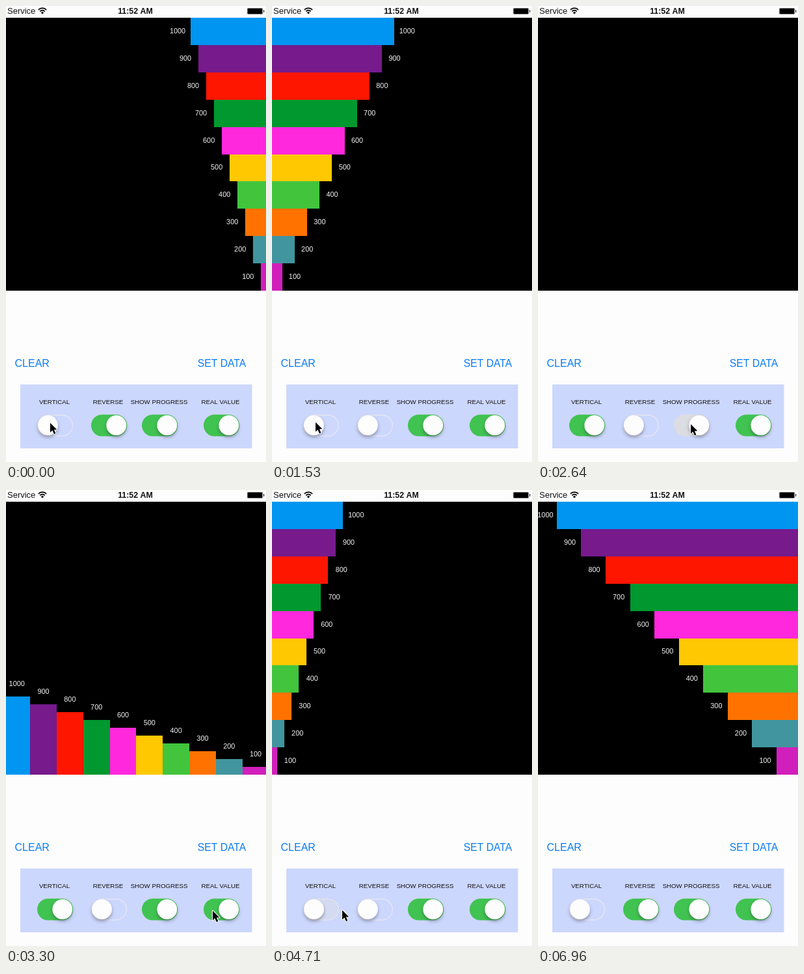
An HTML page with a canvas for the animation above (6.99 s loop, 400 by 700 pixels).

```html
<!DOCTYPE html>
<html lang="en">
<head>
<meta charset="utf-8">
<title>Bar chart demo</title>
<style>
  html, body { margin: 0; width: 100%; height: 100%; overflow: hidden; background: #fdfdfd; }
  canvas { display: block; width: 400px; height: 700px; }
</style>
</head>
<body>
<canvas id="stage"></canvas>
<script>
const LOOP = 6990, STEP = 30, GROW = 450, SLIDE = 100;
const FONT = '"Liberation Sans", Arial, sans-serif';
const PAPER = '#fdfdfd', GREEN = '#40c351', BLUE = '#0a7bf2';
const COLORS = ['#0095f0', '#761a8c', '#ff1600', '#00982f', '#ff28dc',
                '#ffc800', '#42c43d', '#ff7200', '#40959e', '#d11fbb'];

// Chart area; the bars run slightly past both sides of the screen.
const TOP = 18, BOTTOM = 437, LEFT = -3.7, RIGHT = 404.5;
const ROW = (BOTTOM - TOP) / 10, COL = (RIGHT - LEFT) / 10;

const SWITCHES = [
  { key: 'vertical', text: 'VERTICAL', x: 48, mid: 74.5 },
  { key: 'reverse', text: 'REVERSE', x: 131, mid: 157 },
  { key: 'progress', text: 'SHOW PROGRESS', x: 209, mid: 235.5 },
  { key: 'real', text: 'REAL VALUE', x: 304, mid: 330 }
];
const START = { vertical: false, reverse: true, progress: true, real: true };
const FIRST_GROW = -144;
const TAPS = [
  [400, 'vertical'], [910, 'reverse'], [1300, 'vertical'], [1689, 'vertical'],
  [2640, 'progress'], [3153, 'progress'], [3490, 'real'], [4060, 'real'],
  [4575, 'vertical'], [5290, 'reverse']
];
const POINTER = [
  [0, 68, 640], [450, 68, 640], [800, 152, 640], [1000, 152, 640],
  [1250, 67, 639], [2150, 67, 639], [2500, 235, 642], [3180, 235, 642],
  [3300, 318, 646], [3420, 327, 639], [4150, 327, 639], [4500, 68, 640],
  [4600, 68, 640], [4710, 108, 645], [4950, 150, 642], [5400, 150, 642],
  [5700, 405, 650]
];

const canvas = document.getElementById('stage');
const ctx = canvas.getContext('2d');
const ratio = window.devicePixelRatio || 1;
canvas.width = 400 * ratio;
canvas.height = 700 * ratio;
ctx.scale(ratio, ratio);

const clamp = v => Math.max(0, Math.min(1, v));

function rect(x, y, w, h, color) {
  ctx.fillStyle = color;
  ctx.fillRect(x, y, w, h);
}

// Bars have crisp edges on whole pixels.
function bar(x, y, w, h, color) {
  const left = Math.round(x), top = Math.round(y);
  rect(left, top, Math.round(x + w) - left, Math.round(y + h) - top, color);
}

function pill(x, y, w, h, r) {
  ctx.beginPath();
  ctx.roundRect(x, y, w, h, r);
}

function text(str, x, y, size, color, align = 'center', weight = '') {
  ctx.font = `${weight} ${size}px ${FONT}`;
  ctx.textAlign = align;
  ctx.textBaseline = 'middle';
  ctx.fillStyle = color;
  ctx.fillText(str, x, y);
}

function stateAt(t) {
  const state = { ...START, since: FIRST_GROW, tapped: {} };
  for (const [time, key] of TAPS) {
    if (time > t) break;
    state[key] = !state[key];
    state.since = state.tapped[key] = time;
  }
  return state;
}

function drawStatus() {
  text('Service', 2, 8.5, 13, '#111', 'left');
  text('11:52 AM', 199, 8.6, 12.4, '#111', 'center', 'bold');

  // Signal fan
  ctx.strokeStyle = ctx.fillStyle = '#111';
  ctx.lineWidth = 1.9;
  for (const r of [5.3, 8.7]) {
    ctx.beginPath();
    ctx.arc(56, 12, r, -Math.PI * 0.75, -Math.PI * 0.25);
    ctx.stroke();
  }
  ctx.beginPath();
  ctx.moveTo(56, 12.5);
  ctx.arc(56, 12.5, 3.2, -Math.PI * 0.75, -Math.PI * 0.25);
  ctx.fill();

  // Battery
  pill(370.8, 3, 24.4, 9.8, 2);
  ctx.fillStyle = '#777';
  ctx.fill();
  rect(372, 4, 22, 8, '#000');
  rect(396, 6.2, 1.3, 3.5, '#333');
}

function drawChart(state, t) {
  rect(0, TOP, 400, BOTTOM - TOP, '#000');
  ctx.save();
  ctx.beginPath();
  ctx.rect(0, TOP, 400, BOTTOM - TOP);
  ctx.clip();

  const { vertical, reverse, progress, real } = state;
  const grown = clamp((t - state.since) / GROW);
  const full = vertical ? (progress ? 366 : 419) : (progress ? 375.7 : 408);
  const gap = vertical ? 20.8 - 5 * grown : 21.6 - 4.2 * grown;

  COLORS.forEach((color, i) => {
    const n = 10 - i;
    const len = full * grown * n / 10;
    let x, y;
    if (vertical) {
      const left = LEFT + i * COL;
      bar(left, reverse ? TOP : BOTTOM - len, COL, len, color);
      x = left + COL / 2;
      y = reverse ? TOP + len + gap : BOTTOM - len - gap;
    } else {
      const top = TOP + i * ROW;
      bar(reverse ? RIGHT - len : LEFT, top, len, ROW, color);
      x = reverse ? RIGHT - len - gap : LEFT + len + gap;
      y = top + ROW / 2;
    }
    if (progress) {
      // Truncation makes 70 percent read as 69.
      const percent = n === 7 ? 69 : n * 10;
      text(real ? n * 100 : percent + '%', x, y, 10.9, '#f4f4f4');
    }
  });
  ctx.restore();
}

function drawSwitch({ key, text: label, x, mid }, state, t) {
  text(label, mid, 608, 9.7, '#111');

  const age = t - (state.tapped[key] ?? -1000);
  const eased = 1 - (1 - clamp(age / SLIDE)) ** 2;
  const pos = state[key] ? eased : 1 - eased;

  pill(x + 0.8, 628, 53.6, 32, 16);
  ctx.globalAlpha = 1 - pos;
  ctx.strokeStyle = '#e4e6f2';
  ctx.lineWidth = 1.4;
  ctx.stroke();
  pill(x, 627.2, 55.2, 33.4, 16.7);
  ctx.globalAlpha = state[key] ? eased : 1 - clamp(age / 240);
  ctx.fillStyle = state[key] ? GREEN : '#dcdde2';
  ctx.fill();
  ctx.globalAlpha = 1;

  ctx.save();
  ctx.shadowColor = 'rgba(50, 50, 60, 0.42)';
  ctx.shadowBlur = 5 * ratio;
  ctx.shadowOffsetY = 3 * ratio;
  ctx.beginPath();
  ctx.arc(x + 16.5 + 22.3 * pos, 643.7, 15.4, 0, Math.PI * 2);
  ctx.fillStyle = PAPER;
  ctx.fill();
  ctx.restore();
}

function drawPointer(t) {
  const next = POINTER.findIndex(p => p[0] > t);
  if (next < 1) return;
  const [t0, x0, y0] = POINTER[next - 1];
  const [t1, x1, y1] = POINTER[next];
  const k = (t - t0) / (t1 - t0);

  ctx.save();
  ctx.translate(x0 + (x1 - x0) * k, y0 + (y1 - y0) * k);
  ctx.beginPath();
  ctx.moveTo(0, 0);
  for (const [x, y] of [[0, 14.5], [3.4, 11.4], [6, 17.2], [8.4, 16.1], [5.9, 10.5], [10.3, 10.2]]) {
    ctx.lineTo(x, y);
  }
  ctx.closePath();
  ctx.lineJoin = 'round';
  ctx.lineWidth = 2;
  ctx.strokeStyle = '#fff';
  ctx.stroke();
  ctx.fillStyle = '#000';
  ctx.fill();
  ctx.restore();
}

function draw(t) {
  const state = stateAt(t);
  rect(0, 0, 400, 700, PAPER);
  drawStatus();
  drawChart(state, t);
  text('CLEAR', 13.5, 550, 16, BLUE, 'left');
  text('SET DATA', 332, 550, 15.7, BLUE);
  rect(22, 581, 356.5, 98, '#ccd7fd');
  for (const item of SWITCHES) drawSwitch(item, state, t);
  drawPointer(t);
}

const begin = performance.now();
function tick() {
  const t = (performance.now() - begin) % LOOP;
  draw(Math.floor(t / STEP) * STEP);
  requestAnimationFrame(tick);
}
tick();
</script>
</body>
</html>
```
